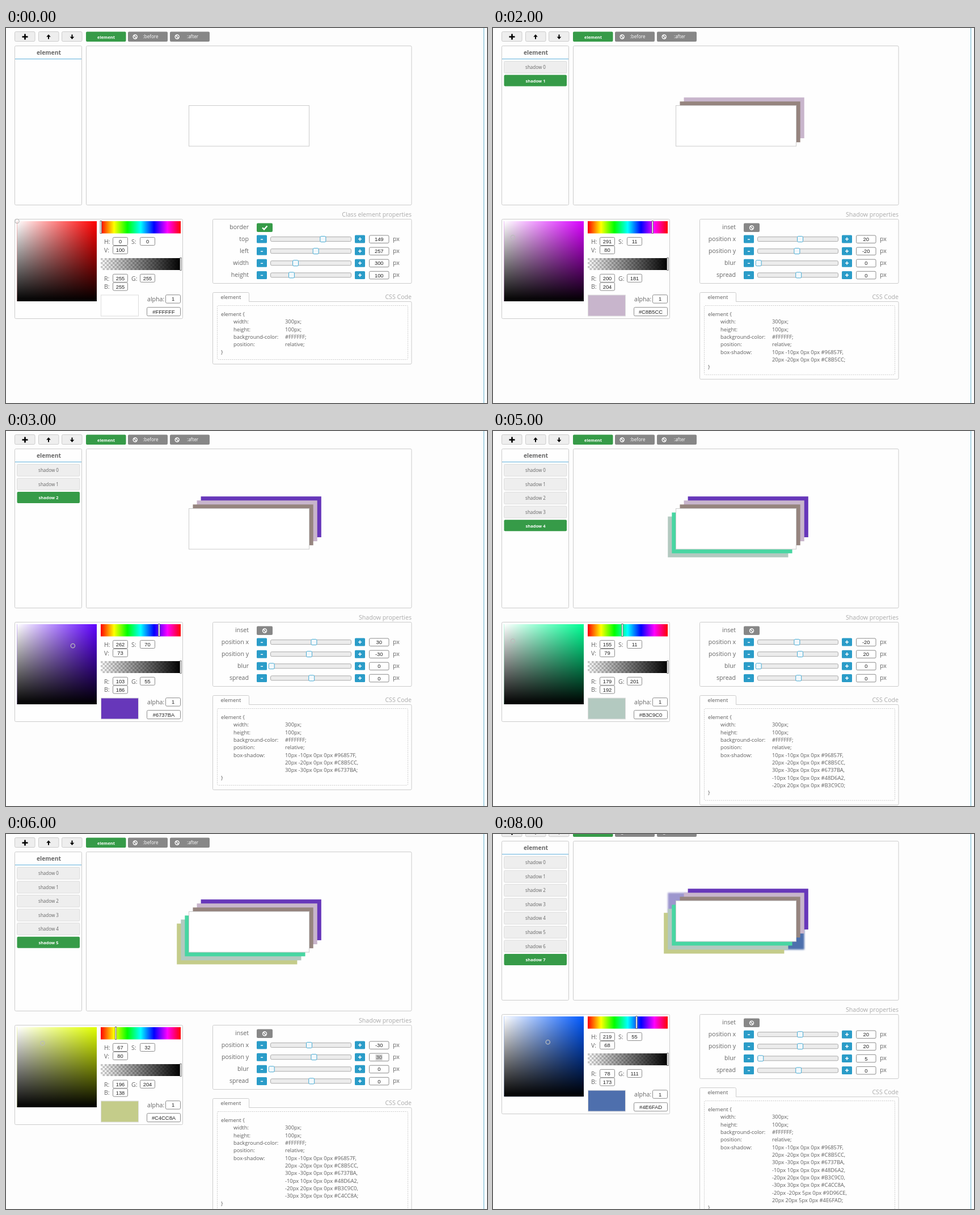
Animation of 848 by 660 pixels, one loop 9 s. Source, as an HTML page:

```html
<!DOCTYPE html>
<html lang="en">
<head>
<meta charset="utf-8">
<title>Box shadow editor</title>
<style>
html, body { margin: 0; width: 100%; height: 100%; overflow: hidden; background: #fdfdfd; }
svg { display: block; width: 848px; height: 660px; }
text { font-family: "Open Sans", "Noto Sans", sans-serif; font-size: 10.6px; fill: #666; white-space: pre; }
.field { font-family: "Liberation Sans", Arial, sans-serif; font-size: 9.4px; fill: #222; }
.code { font-size: 9.35px; fill: #5c5c5c; }
.small { font-size: 8.05px; }
.bold { font-weight: bold; font-size: 7.45px; }
.title { font-weight: bold; font-size: 10.4px; }
.head { fill: #aaa; }
.light { fill: #fff; }
</style>
</head>
<body>
<svg viewBox="0 0 848 660" xmlns="http://www.w3.org/2000/svg">
  <defs>
    <linearGradient id="white"><stop stop-color="#fff"/><stop offset="1" stop-color="#fff" stop-opacity="0"/></linearGradient>
    <linearGradient id="black" x2="0" y2="1"><stop stop-opacity="0"/><stop offset="1"/></linearGradient>
    <linearGradient id="alpha"><stop stop-opacity="0"/><stop offset="1"/></linearGradient>
    <linearGradient id="hues"></linearGradient>
    <pattern id="checker" x="167" y="405" width="7" height="7" patternUnits="userSpaceOnUse">
      <path d="M0 0h7v7h-7z" fill="#fff"/><path d="M0 0h3.5v7h3.5v-3.5h-7z" fill="#c8c8c8"/>
    </pattern>
    <filter id="blur" x="-10%" y="-20%" width="120%" height="140%"><feGaussianBlur stdDeviation="1.77"/></filter>
  </defs>
  <g id="page"></g>
  <path d="M842.5 0V660" stroke="#68b2cf"/>
</svg>
<script>
const STEP = 1000, LOOP = 9000, SCALE = 0.7072, LINE = 13.33;
const GREEN = '#369b48', GREY = '#878787', BLUE = '#2a9cc8', RULE = '#ccc';

const shadows = [
  { x: 10, y: -10, blur: 0, color: '#96857F', hsv: [16, 15, 59] },
  { x: 20, y: -20, blur: 0, color: '#C8B5CC', hsv: [291, 11, 80] },
  { x: 30, y: -30, blur: 0, color: '#6737BA', hsv: [262, 70, 73] },
  { x: -10, y: 10, blur: 0, color: '#48D6A2', hsv: [158, 66, 84] },
  { x: -20, y: 20, blur: 0, color: '#B3C9C0', hsv: [155, 11, 79] },
  { x: -30, y: 30, blur: 0, color: '#C4CC8A', hsv: [67, 32, 80] },
  { x: -20, y: -20, blur: 5, color: '#9D96CE', hsv: [247, 27, 81] },
  { x: 20, y: 20, blur: 5, color: '#4E6FAD', hsv: [219, 55, 68] }
];

const text = (x, y, s, cls = '', anchor = 'start') =>
  `<text x="${x}" y="${y}" class="${cls}" text-anchor="${anchor}">${s}</text>`;
const rect = (x, y, w, h, fill, stroke = 'none', r = 0, extra = '') =>
  `<rect x="${x}" y="${y}" width="${w}" height="${h}" fill="${fill}" stroke="${stroke}" rx="${r}" ${extra}/>`;
const path = (d, stroke, width = 1, fill = 'none') =>
  `<path d="${d}" stroke="${stroke}" stroke-width="${width}" fill="${fill}"/>`;
const panel = (x, y, w, h) => rect(x, y, w, h, '#fefefe', RULE, 2);
const field = (x, y, w, value, h = 14) =>
  rect(x, y, w, h, '#fff', '#8c8c8c', 2) + text(x + w / 2, y + h / 2 + 3.5, value, 'field', 'middle');
const ban = (x, y) =>
  `<circle cx="${x}" cy="${y}" r="3.5" fill="none" stroke="#fff" stroke-width="1.4"/>` +
  path(`M${x - 2.4} ${y - 2.4}l4.8 4.8`, '#fff', 1.4);

function toolbar() {
  const buttons = [15.5, 57.5, 98.5].map(x => rect(x, 6.5, 35.5, 17, '#eee', RULE, 2)).join('');
  const arrow = (x, d) => path(`M${x} ${15.5 + 4 * d}V${15.5 - 1 * d}`, '#000', 2) +
    path(`M${x - 3.8} ${15.5}L${x} ${15.5 - 4.2 * d}L${x + 3.8} ${15.5}z`, 'none', 0, '#000');
  const pseudo = (x, label) => rect(x, 6.5, 70, 17.5, GREY, 'none', 2) + ban(x + 12.7, 15.5) +
    text(x + 40, 18.3, label, 'small light', 'middle');
  return buttons + path('M28.5 15.5h10M33.5 10.5v10', '#000', 2.6) + arrow(75, 1) + arrow(116.5, -1) +
    rect(141, 6.5, 70.5, 17.5, GREEN, 'none', 2) + text(176.5, 18.6, 'element', 'bold light', 'middle') +
    pseudo(215, ':before') + pseudo(289, ':after');
}

function list(count) {
  let out = panel(15.5, 31.5, 118, 280) + text(75.5, 47, 'element', 'title', 'middle') +
    path('M16 54.5H133', '#5fb0dc');
  for (let i = 0; i < count; i++) {
    const y = 58 + i * 24.55, active = i === count - 1;
    out += active
      ? rect(19.5, y, 110.5, 20, GREEN, 'none', 2) + text(75, y + 13.3, 'shadow ' + i, 'bold light', 'middle')
      : rect(19.5, y + .5, 110.5, 21, '#eee', '#ddd', 2) + text(75, y + 14.2, 'shadow ' + i, 'small', 'middle');
  }
  return out;
}

function preview(count) {
  let out = panel(141.5, 31.5, 573.5, 280);
  for (const s of shadows.slice(0, count).reverse())
    out += rect(322.4 + s.x * SCALE, 136.4 + s.y * SCALE, 212.2, 71.8, s.color, 'none', 0,
      s.blur ? 'filter="url(#blur)"' : '');
  return out + rect(322.5, 136.5, 212, 71.5, '#fff', RULE);
}

function picker(color, [h, s, v]) {
  const [r, g, b] = [1, 3, 5].map(i => parseInt(color.slice(i, i + 2), 16));
  const square = fill => rect(19.5, 340, 140.5, 141, fill);
  const handle = (x, y) => rect(x - 1.2, y, 2.4, 22, '#fff', '#555', 0, 'stroke-width=".8"');
  const entry = (x, y, name, value) => text(x, y + 11.3, name) + field(x < 200 ? 188.5 : 236.5, y, 26, value);
  return panel(15.5, 336.5, 296, 175) +
    square(`hsl(${h},100%,50%)`) + square('url(#white)') + square('url(#black)') +
    `<circle cx="${19.5 + s * 1.405}" cy="${340 + (100 - v) * 1.41}" r="3.6" fill="none" stroke="#bbb" stroke-width="1.3"/>` +
    rect(167, 340, 141, 21.5, 'url(#hues)') + handle(168 + h / 360 * 141 - .7, 339.5) +
    rect(167, 405, 141, 21, 'url(#checker)') + rect(167, 405, 141, 21, 'url(#alpha)') + handle(308, 404.5) +
    entry(173, 368.5, 'H:', h) + entry(221, 368.5, 'S:', s) + entry(173, 383.5, 'V:', v) +
    entry(173, 433.3, 'R:', r) + entry(221, 433.3, 'G:', g) + entry(173, 448, 'B:', b) +
    rect(167.5, 470, 66, 37, color, '#ddd') + text(249, 481, 'alpha:') +
    field(281.5, 469.7, 26, 1, 14.5) + field(248.5, 491.7, 59, color, 15);
}

function properties(shadow, selected) {
  // Each row: label, value, slider position from 0 to 1.
  const rows = shadow
    ? [['position x', shadow.x, .5 + shadow.x / 1000], ['position y', shadow.y, .5 + shadow.y / 1000],
       ['blur', shadow.blur, shadow.blur / 200], ['spread', 0, .5]]
    : [['top', 149, .643], ['left', 257, .553], ['width', 300, .3], ['height', 100, .25]];
  let out = text(715, 332, shadow ? 'Shadow properties' : 'Class element properties', 'head', 'end') +
    panel(364.5, 336.5, 350.5, 113) + text(428, 353.6, shadow ? 'inset' : 'border', '', 'end') +
    rect(442, 343.5, 28, 15.5, shadow ? GREY : GREEN, 'none', 2) +
    (shadow ? ban(456, 351.5) : path('M452 351.5l3 3l5.5-6', '#fff', 2.4));
  rows.forEach(([label, value, at], i) => {
    const y = 371.6 + i * 21.1;
    out += text(428, y + 3.1, label, '', 'end') +
      rect(442, y - 7, 18, 14, BLUE, 'none', 1.5) + path(`M449 ${y + .5}h4`, '#fff', 1.4) +
      rect(615, y - 7, 18, 14, BLUE, 'none', 1.5) + path(`M621 ${y}h6M624 ${y - 3}v6`, '#fff', 1.5) +
      rect(466.5, y - 4, 142, 8, '#ececec', '#aaa', 2) +
      rect(463.2 + at * 141, y - 5, 10, 10, '#f2f8fb', '#45aad3', 2) +
      field(640.5, y - 6.6, 34.5, value, 13.5) + text(682, y + 3.1, 'px');
    if (selected && i === 1)
      out += rect(651.5, y - 4.5, value < 0 ? 14 : 12, 10, '#999', 'none', 0, 'opacity=".5"');
  });
  return out;
}

function cssCode(count, selected) {
  const lines = [['width:', '300px;'], ['height:', '100px;'], ['background-color:', '#FFFFFF;'], ['position:', 'relative;']];
  shadows.slice(0, count).forEach((s, i) => lines.push([i ? '' : 'box-shadow:',
    `${s.x}px ${s.y}px ${s.blur}px 0px ${s.color}${i < count - 1 ? ',' : ';'}`]));
  const grow = count * LINE, baseline = i => 507 + i * LINE;
  let out = text(715, 476.5, 'CSS Code', 'head', 'end') + panel(364.5, 481.5, 350.5, 110 + grow) +
    path('M364.5 484V467.5q0-2 2-2H426.500q2 0 2 2V481.500', RULE, 1, '#fefefe') +
    path('M365 481.500H428', '#fefefe', 1.4) + text(378.5, 477, 'element', 'code') +
    rect(372.5, 488.5, 336, 95 + grow, 'none', '#ccc', 2, 'stroke-dasharray="2 1.5"') +
    text(379, baseline(0), 'element {', 'code');
  if (selected) out += rect(492, baseline(lines.length) - 10, 130, 13, '#c2c2c2');
  lines.forEach(([key, value], i) => {
    out += text(401, baseline(i + 1), key, 'code') + text(492, baseline(i + 1), value, 'code');
  });
  return out + text(379, baseline(lines.length + 1), '}', 'code');
}

const page = document.getElementById('page');
document.getElementById('hues').innerHTML = [0, 1, 2, 3, 4, 5, 6]
  .map(i => `<stop offset="${i / 6}" stop-color="hsl(${i * 60},100%,50%)"/>`).join('');

function draw(count) {
  const shadow = shadows[count - 1];
  const scroll = count === 7 ? 3.6 : count === 8 ? 18.9 : 0;
  page.setAttribute('transform', `translate(0 ${-scroll})`);
  page.innerHTML = toolbar() + list(count) + preview(count) +
    picker(shadow ? shadow.color : '#FFFFFF', shadow ? shadow.hsv : [0, 0, 100]) +
    properties(shadow, count === 6 || count === 7) + cssCode(count, count === 4);
}

let shown = -1;
const start = performance.now();
function tick() {
  const step = Math.floor((performance.now() - start) % LOOP / STEP);
  if (step !== shown) draw(shown = step);
  requestAnimationFrame(tick);
}
tick();
</script>
</body>
</html>
```
